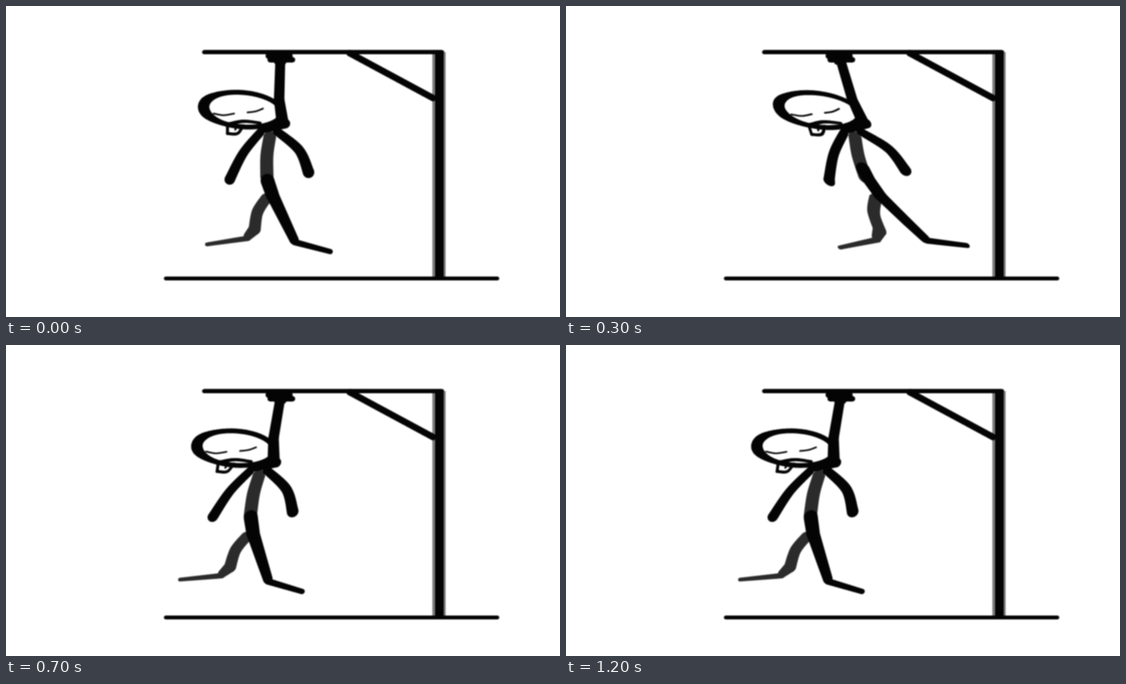
Animation of 998 by 561 pixels, one loop 1300 ms. Source, as an HTML page with a canvas:

```html
<!DOCTYPE html>
<html lang="en">
<head>
<meta charset="utf-8">
<title>Swing</title>
<style>
  html, body { margin: 0; width: 100%; height: 100%; overflow: hidden; background: #fff; }
  canvas { display: block; width: 100vw; height: 100vh; filter: blur(1.1px); }
</style>
</head>
<body>
<canvas id="stage" width="998" height="561"></canvas>
<script>
const ctx = document.getElementById('stage').getContext('2d');
const INK = '#040404', GREY = '#2b2b2b';
const PIVOT = { x: 495, y: 96 };
const STEP_MS = 100;

// Sideways lean per pixel of drop, from far left (A) to far right (G).
const leans = { A: -.31, B: -.22, C: -.14, D: 0, E: .094, F: .21, G: .325 };
const sequence = 'DEFGGEDCBAABC';

const still = (x, y) => [x, y];

// Leans everything below the pivot, kicks the legs further out at wide swings
// and lifts the side that leads.
const swing = lean => (x, y) => {
  const dx = x - PIVOT.x, drop = Math.max(0, y - PIVOT.y);
  const kick = Math.sign(lean) * lean ** 4 * (lean < 0 ? 39 : 17);
  const lift = lean * (dx * lean > 0 ? .0011 : .0004);
  return [x + lean * drop + kick * Math.max(0, y - 310), y - lift * dx * drop];
};

const spline = (a, b, c, d, t) =>
  b + .5 * t * (c - a + t * (2 * a - 5 * b + 4 * c - d + t * (3 * (b - c) + d - a)));

// Sweeps a round brush along at(0..1) => [x, y, radius]; the warp bends its outline.
function sweep(warp, color, steps, at) {
  ctx.fillStyle = color;
  ctx.beginPath();
  for (let i = 0; i <= steps; i++) {
    const [x, y, r] = at(i / steps);
    for (let k = 0; k < 16; k++) {
      const a = k * Math.PI / 8;
      const point = warp(x + r * Math.cos(a), y + r * Math.sin(a));
      k ? ctx.lineTo(...point) : ctx.moveTo(...point);
    }
    ctx.closePath();
  }
  ctx.fill();
}

// Smooth stroke through a few points, its radius going from r0 to r1.
function stroke(warp, color, r0, r1, ...pts) {
  const spans = pts.length - 1;
  const pick = i => pts[Math.max(0, Math.min(spans, i))];
  const length = pts.reduce((sum, p, i) => sum + Math.hypot(p[0] - pick(i - 1)[0], p[1] - pick(i - 1)[1]), 0);
  sweep(warp, color, Math.ceil(length * 1.5), t => {
    const i = Math.min(spans - 1, Math.floor(t * spans));
    const coord = k => spans === 1
      ? pts[0][k] + (pts[1][k] - pts[0][k]) * t
      : spline(pick(i - 1)[k], pick(i)[k], pick(i + 1)[k], pick(i + 2)[k], t * spans - i);
    return [coord(0), coord(1), r0 + (r1 - r0) * t];
  });
}

function drawGallows() {
  const ink = (r, ...pts) => stroke(still, INK, r, r, ...pts);
  ctx.fillStyle = '#7c7c7c';
  ctx.fillRect(768, 83, 24, 406);
  ctx.fillStyle = INK;
  ctx.fillRect(773, 80, 15.5, 410);
  ink(3.8, [357, 83.3], [785, 83.3]);
  ink(6, [619, 85], [769, 166]);
  ink(3.6, [288, 491.5], [885, 491.5]);
  ink(5.5, [473, 90], [511, 90]);
  ink(5, [476, 97], [516, 97]);
  ink(5, [488, 101], [500, 101]);
}

function drawHead(warp, ink) {
  // slightly tilted ring, heavier on its left
  sweep(warp, INK, 300, t => {
    const c = Math.cos(t * 2 * Math.PI), s = Math.sin(t * 2 * Math.PI);
    return [426 + 70 * c, 187 + 5 * c + 31 * s, 4.4 + 6 * Math.max(0, -c) ** 4];
  });
  ink(1.5, 1.5, [374, 194], [392, 197], [411, 194]);
  ink(1.5, 1.5, [435, 192], [450, 190], [463, 185]);
  ink(3.5, 2.5, [402, 213], [428, 208], [458, 211]);
  // tongue
  ink(2.7, 2.7, [399, 216], [399, 230]);
  ink(2.7, 2.7, [399, 230], [417, 230], [427, 216]);
  ink(1.8, 1.8, [416, 215], [413, 223]);
}

function drawFigure(lean) {
  const warp = swing(lean);
  const ink = (...args) => stroke(warp, INK, ...args);
  const grey = (...args) => stroke(warp, GREY, ...args);

  // torso and far leg
  grey(11.5, 12, [475, 237], [470, 270], [470, 308]);
  grey(10, 11, [468, 348], [453, 372], [448, 402]);
  grey(11, 8, [448, 402], [436, 415]);
  grey(5, 3.5, [436, 419], [362, 430]);

  // hip and near leg
  ink(12.5, 12, [471, 315 - 200 * lean ** 2], [480, 341]);
  ink(11.5, 8.5, [480, 341], [519, 422]);
  ink(5.8, 4.8, [520, 426], [584, 443]);

  // arms
  ink(7.5, 9.5, [458, 228], [427, 266], [403, 313]);
  ink(7.5, 10.5, [488, 226], [528, 260], [545, 300]);

  // rope and noose
  ink(9, 9.5, [494, 102], [492, 170]);
  ink(9.5, 11, [492, 168], [498, 209]);
  ink(9, 6, [503, 212], [460, 224]);

  drawHead(warp, ink);
}

let shown;
const start = performance.now();

function frame() {
  const step = Math.floor((performance.now() - start) / STEP_MS) % sequence.length;
  const key = sequence[step];
  if (key !== shown) {
    shown = key;
    ctx.fillStyle = '#fff';
    ctx.fillRect(0, 0, 998, 561);
    drawGallows();
    drawFigure(leans[key]);
  }
  requestAnimationFrame(frame);
}
frame();
</script>
</body>
</html>
```
